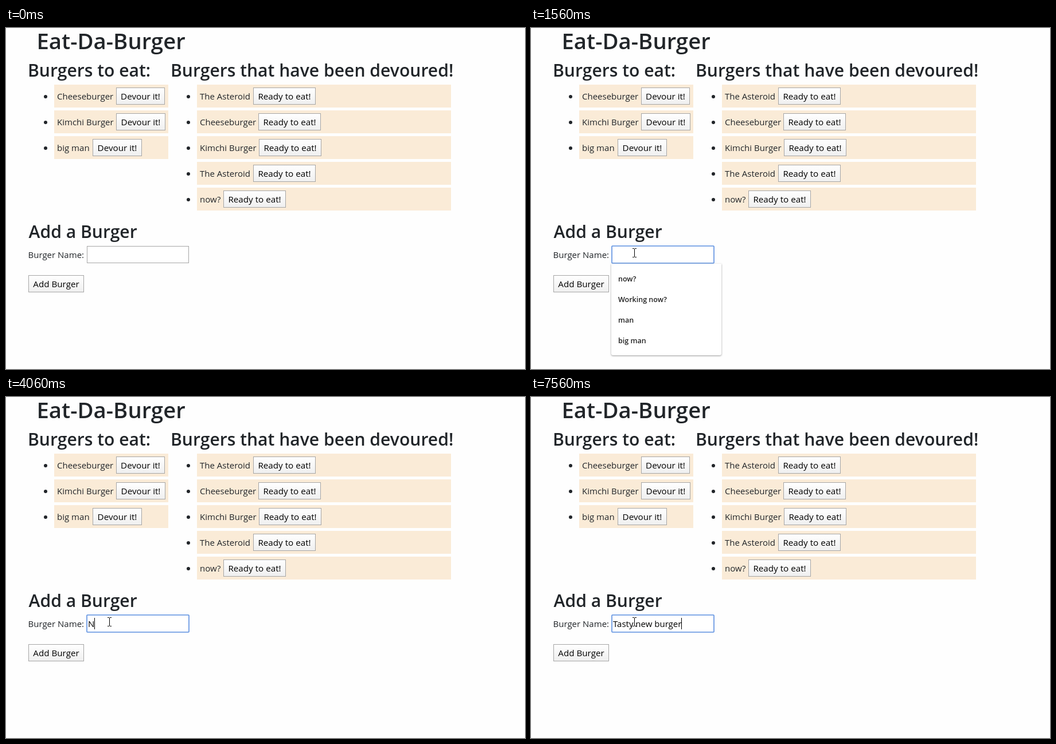
Write an HTML page with a canvas that moves like this. It is 905 by 596 pixels and loops after 8 s.

```html
<!DOCTYPE html>
<html lang="en">
<head>
<meta charset="utf-8">
<title>Eat-Da-Burger</title>
<style>
html, body { margin: 0; width: 100%; height: 100%; overflow: hidden; background: #fefefe; }
canvas { display: block; }
</style>
</head>
<body>
<canvas id="stage" width="905" height="596"></canvas>
<script>
const ctx = document.getElementById('stage').getContext('2d');
const LOOP = 8000;
const INK = '#212529';
const BODY = 15, BUTTON = 15.2, HEADING = 30.1, TITLE = 38.3;

const toEat = [['Cheeseburger', 192, 85], ['Kimchi Burger', 192, 86], ['big man', 151, 86]];
const devoured = [['The Asteroid', 431, 109], ['Cheeseburger', 440, 109], ['Kimchi Burger', 441, 109],
                  ['The Asteroid', 431, 109], ['now?', 379, 109]];
const suggestions = ['now?', 'Working now?', 'man', 'big man'];

// [start time, field text, caret visible, number of suggestions]
const typing = [
  [1100, '', true, 4], [1560, '', false, 4], [2110, '', true, 4],
  [2260, 'N', true, 1], [2420, 'Ne', true, 0], [2570, 'New', true, 0], [2740, 'New ', true, 0],
  [2900, 'New =', true, 0], [3130, 'New ==', true, 0], [3440, 'New =', true, 0], [3590, 'New =', false, 0],
  [3910, 'New ', true, 0], [3990, 'New', true, 0], [4060, 'N', true, 0], [4140, '', true, 0],
  [4520, 'T', true, 0], [4750, 'Ta', true, 0], [4980, 'Tas', true, 0], [5150, 'Tast', true, 0],
  [5300, 'Tasty', true, 0], [5470, 'Tasty ', true, 0],
  [5620, 'Tasty n', true, 0], [5770, 'Tasty ne', true, 0], [6000, 'Tasty new ', true, 0],
  [6400, 'Tasty new b', true, 0], [6550, 'Tasty new bu', true, 0], [6700, 'Tasty new bur', true, 0],
  [6860, 'Tasty new burg', true, 0], [7410, 'Tasty new burge', true, 0], [7560, 'Tasty new burger', true, 0]
];

function rect(x, y, w, h, color) {
  ctx.fillStyle = color;
  ctx.fillRect(x, y, w, h);
}

function text(str, x, y, size = BODY, weight = 400, color = INK, align = 'left') {
  ctx.font = `${weight} ${size}px "Open Sans", "Noto Sans", sans-serif`;
  ctx.fillStyle = color;
  ctx.textAlign = align;
  ctx.fillText(str, x, y);
}

function button(label, x, y, w) {
  const shade = ctx.createLinearGradient(0, y, 0, y + 30);
  shade.addColorStop(0, '#fff');
  shade.addColorStop(1, '#efefef');
  rect(x, y, w, 30, '#a6a6a6');
  rect(x + 1, y + 1, w - 2, 28, shade);
  text(label, x + w / 2, y + 21, BUTTON, 400, '#000', 'center');
}

function list(items, x, w, label) {
  items.forEach(([name, buttonX, buttonW], i) => {
    const y = 99 + i * 45;
    rect(x, y, w, 40, '#faebd7');
    ctx.fillStyle = INK;
    ctx.beginPath();
    ctx.arc(x - 15, y + 21, 3, 0, Math.PI * 2);
    ctx.fill();
    text(name, x + 5, y + 26);
    button(label, buttonX, y + 5, buttonW);
  });
}

function page() {
  rect(0, 0, 905, 596, '#fefefe');
  text('Eat-Da-Burger', 53.5, 37, TITLE, 600);
  text('Burgers to eat:', 38, 85, HEADING, 600);
  text('Burgers that have been devoured!', 287, 85, HEADING, 600);
  list(toEat, 84, 199, 'Devour it!');
  list(devoured, 333, 443, 'Ready to eat!');
  text('Add a Burger', 39.5, 367, HEADING, 600);
  text('Burger Name:', 38.5, 402);
  button('Add Burger', 39, 432, 97);
}

function field(focused, value, caret) {
  rect(141, 381, 178, 30, focused ? '#fff' : '#a6a6a6');
  rect(142, 382, 176, 28, '#fff');
  if (focused) {
    ctx.strokeStyle = '#5a8ee0';
    ctx.lineWidth = 1.6;
    ctx.beginPath();
    ctx.roundRect(141, 381, 178, 30, 1);
    ctx.stroke();
  }
  text(value, 143, 402, BODY, 400, '#000');
  if (caret) rect(Math.floor(143 + ctx.measureText(value).width), 386, 1, 20, '#000');
}

function popup(count) {
  if (!count) return;
  ctx.save();
  ctx.shadowColor = 'rgba(0,0,0,.4)';
  ctx.shadowBlur = 3;
  ctx.shadowOffsetY = 1;
  ctx.fillStyle = '#fff';
  ctx.beginPath();
  ctx.roundRect(140, 412, 192, 16 + count * 36, [0, 0, 3, 3]);
  ctx.fill();
  ctx.restore();
  suggestions.slice(0, count).forEach((s, i) => text(s, 152, 443 + i * 36, 12.5, 600, '#222'));
}

function arrow(x, y) {
  ctx.beginPath();
  [[0, 0], [0, 16], [4, 12.5], [6.5, 18], [9, 17], [6.5, 11.5], [11.5, 11.5]]
    .forEach(([dx, dy]) => ctx.lineTo(x + dx + .5, y + dy + .5));
  ctx.closePath();
  ctx.fillStyle = '#fff';
  ctx.fill();
  ctx.strokeStyle = '#000';
  ctx.lineWidth = 1;
  ctx.stroke();
}

function iBeam(x, y) {
  rect(x, y - 7, 1, 14, '#000');
  for (const edge of [y - 8, y + 7]) {
    rect(x - 3, edge, 3, 1, '#000');
    rect(x + 1, edge, 3, 1, '#000');
  }
}

function pointer(t) {
  if (t < 150) return;
  if (t >= 1010) return iBeam(180, 393);
  const p = Math.min(1, Math.floor((t - 150) / 98.75) / 8);
  const left = (1 - p) ** 2;
  const x = Math.round(181 + 418 * left), y = Math.round(394 + 110 * left);
  const overField = x > 140 && x < 319 && y > 380 && y < 411;
  (overField ? iBeam : arrow)(x, y);
}

function draw(now) {
  const t = now % LOOP;
  const [, value, caret, count] = typing.findLast(([start]) => start <= t) || [0, '', false, 0];
  page();
  field(t >= 1010, value, caret);
  popup(count);
  pointer(t);
  requestAnimationFrame(draw);
}
requestAnimationFrame(draw);
</script>
</body>
</html>
```
